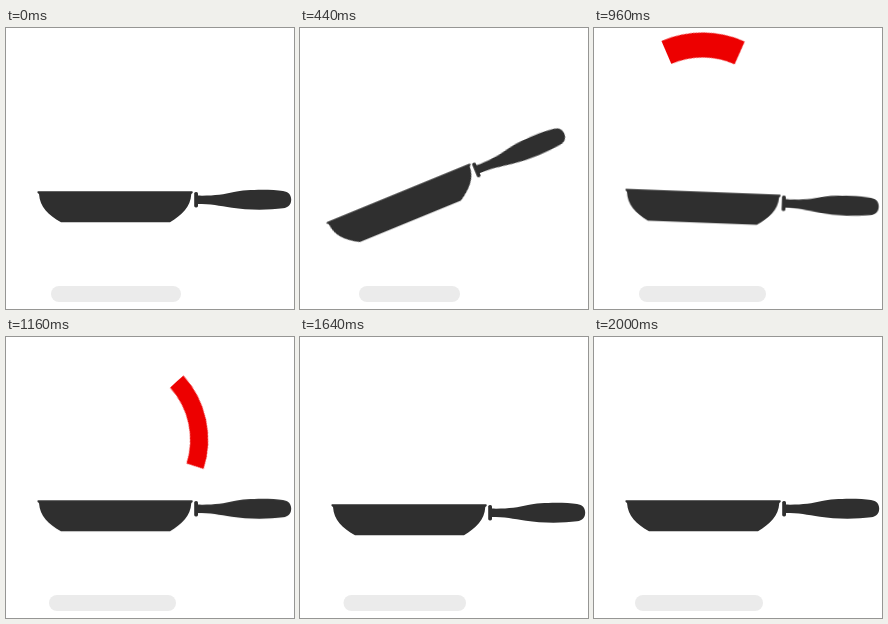
An HTML page for the animation above (2280 ms loop, 288 by 281 pixels).

```html
<!DOCTYPE html>
<html lang="en">
<head>
<meta charset="utf-8">
<title>Pan toss</title>
<style>
  html, body { margin: 0; width: 100%; height: 100%; overflow: hidden; background: #fff; }
  svg { display: block; width: 288px; height: 281px; }

  .shadow, .pan, .arc { animation: 2280ms linear infinite; }

  .shadow { fill: #ebebeb; animation-name: shadow; }
  .pan { fill: #2f2f2f; transform-origin: 109.25px 163.5px; animation-name: toss; }
  .arc { fill: none; stroke: #ed0000; animation-name: flip; }

  @keyframes shadow {
    0% { x: 45px; width: 130px; animation-timing-function: ease-in-out; }
    19.298% { x: 59px; width: 101px; }
    21.053% { x: 59px; width: 101px; animation-timing-function: ease-in-out; }
    29.825% { x: 46px; width: 127px; }
    42.105% { x: 45px; width: 127px; }
    59.649% { x: 41px; width: 127px; }
    71.93% { x: 43.5px; width: 122.5px; }
    87.719%, 100% { x: 41px; width: 128px; }
  }

  /* wind up, snap, settle, then dip as the food lands */
  @keyframes toss {
    0% { transform: translate(0, 0) rotate(0deg); animation-timing-function: ease-in; }
    19.298% { transform: translate(-10.75px, 1.5px) rotate(-22.2deg); animation-timing-function: ease-out; }
    21.053% { transform: translate(-11.5px, 1.6px) rotate(-24.7deg); animation-timing-function: ease-in-out; }
    29.825% { transform: translate(.25px, 1px) rotate(6.3deg); }
    42.105% { transform: translate(0, .5px) rotate(2.2deg); }
    49.123%, 50.877% { transform: translate(0, 0) rotate(0deg); animation-timing-function: ease-out; }
    59.649% { transform: translate(0, 6px) rotate(0deg); animation-timing-function: ease-in; }
    71.93% { transform: translate(0, 4px) rotate(0deg); animation-timing-function: ease-out; }
    87.719%, 100% { transform: translate(0, 0) rotate(0deg); }
  }

  /* rotation is the tail of the streak, the dash is its length in degrees */
  @keyframes flip {
    0%, 22.807% {
      transform: translate(110.5px, 102.8px) rotate(-200deg);
      r: 86.7px; stroke-width: 18px; stroke-dasharray: 0 360;
    }
    24.561% {
      transform: translate(111.5px, 102.8px) rotate(-200deg);
      r: 86.7px; stroke-width: 18px; stroke-dasharray: 24 360;
    }
    29.825% {
      transform: translate(110.5px, 102.8px) rotate(-196.5deg);
      r: 86.7px; stroke-width: 18px; stroke-dasharray: 91 360;
    }
    42.105% {
      transform: translate(108.5px, 108.5px) rotate(-113.5deg);
      r: 91.5px; stroke-width: 25px; stroke-dasharray: 47 360;
    }
    49.123% {
      transform: translate(106.5px, 102.8px) rotate(-74.5deg);
      r: 86.7px; stroke-width: 18px; stroke-dasharray: 91 360;
    }
    54.386%, 100% {
      transform: translate(106.5px, 102.8px) rotate(20deg);
      r: 86.7px; stroke-width: 18px; stroke-dasharray: 0 360;
    }
  }
</style>
</head>
<body>
<svg viewBox="0 0 288 281">
  <rect class="shadow" x="45" y="258" width="130" height="16" rx="8"/>
  <circle class="arc" r="86.7" pathLength="360"/>
  <g class="pan">
    <path d="M32 163.2H186Q187.2 163.4 186.6 165L185.3 166C184.5 179 176 187 164 194.2H55C42 187 34 179 33 166L31.6 165Q31 163.4 32 163.2Z"/>
    <rect x="188.2" y="164" width="3.8" height="15.4" rx="1.6"/>
    <path d="M191 167.6C207 168 217 166.5 228 164C240 161.4 265 161.3 277 163C282.5 163.8 285.2 167 285.2 171.5C285.2 176.5 282.5 179.6 277 180.3C263 182.2 241 182.2 226 179.8C213 177.6 205 176 191 176Z"/>
  </g>
</svg>
</body>
</html>
```
